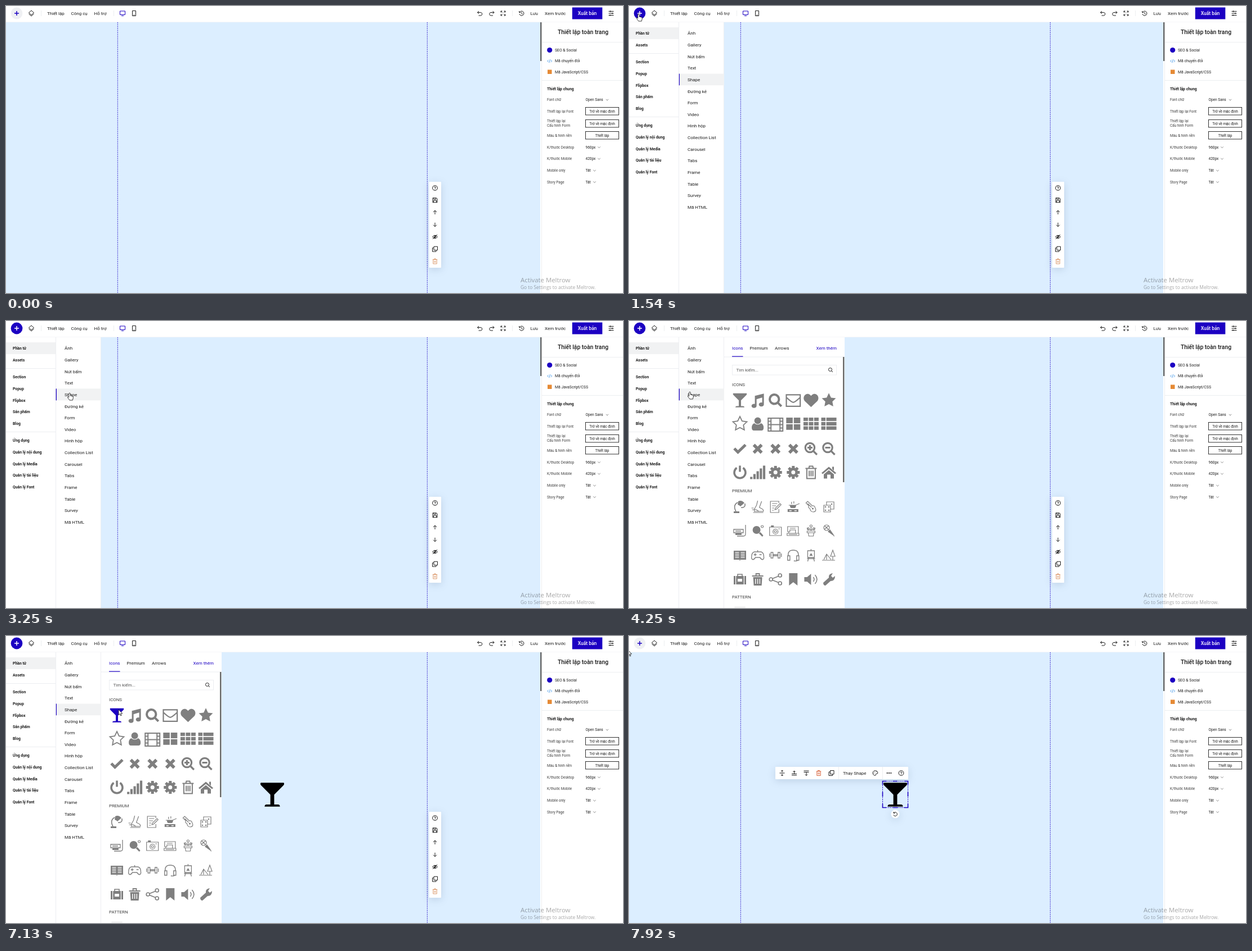
An HTML page for the animation above (8000 ms loop, 1096x511 px).

```html
<!DOCTYPE html>
<html lang="vi">
<head>
<meta charset="utf-8">
<title>Page builder</title>
<style>
html, body { margin: 0; width: 100%; height: 100%; overflow: hidden; background: #fff; }
svg { display: block; width: 100%; height: 100%; font-family: Roboto, sans-serif; }
text { white-space: pre; }
.float { filter: drop-shadow(0 3px 7px rgba(0, 20, 60, .13)); }
</style>
</head>
<body>
<svg id="stage" viewBox="0 0 1096 511"></svg>
<script>
const BLUE = '#1c00c2', INK = '#1c1c1c', GRAY = '#7f7f7f', ORANGE = '#d9905f';
const ROW = 20.65, LOOP = 8000;

// Drawing helpers; text is placed by the middle of its capitals.
const text = (x, y, s, size = 8, attrs = '') =>
  `<text x="${x}" y="${y + size * .36}" font-size="${size}" fill="${INK}" ${attrs}>${s}</text>`;
const rect = (x, y, w, h, fill, attrs = '') =>
  `<rect x="${x}" y="${y}" width="${w}" height="${h}" fill="${fill}" ${attrs}/>`;
const line = (x, y, d, color = INK, width = 1) =>
  `<path transform="translate(${x} ${y})" d="${d}" fill="none" stroke="${color}" stroke-width="${width}"/>`;
const group = (id, body, attrs = '') => `<g id="${id}" ${attrs}>${body}</g>`;
const ring = (r, x = 0, y = 0) => `M${x - r} ${y}a${r} ${r} 0 1 1 ${2 * r} 0a${r} ${r} 0 1 1 ${-2 * r} 0`;
const box = (x, y, w, h) => `M${x} ${y}h${w}v${h}h${-w}Z`;
const grid = (xs, ys, w, h) => ys.map(y => xs.map(x => box(x, y, w, h)).join('')).join('');

const ui = {
  layers: 'M0-5L4.5-1L0 3L-4.5-1ZM-4.5 1L0 5L4.5 1',
  monitor: 'M-4.5-4H4.5V2.5H-4.5ZM-2 4.5H2',
  phone: 'M-3-4.5H3V4.5H-3ZM-1 3H1',
  undo: 'M-2-4L-4.5-1.5L-2 1M-4.5-1.5H1.5A2.8 2.8 0 0 1 1.5 4H-2.5',
  redo: 'M2-4L4.5-1.5L2 1M4.5-1.5H-1.5A2.8 2.8 0 0 0-1.5 4H2.5',
  expand: 'M-4-1.5V-4H-1.5M1.5-4H4V-1.5M4 1.5V4H1.5M-1.5 4H-4V1.5M-4-4L-1.2-1.2M4-4L1.2-1.2M4 4L1.2 1.2M-4 4L-1.2 1.2',
  history: 'M-3.5-2A4 4 0 1 1-4 1M-4.3-4V-1.5H-1.8M0-2V.5L1.8 1.5',
  sliders: 'M-4.5-3.5H4.5M-4.5 0H4.5M-4.5 3.5H4.5M-1.5-4.7V-2.3M2-1.2V1.2M-2 2.3V4.7',
  help: ring(4.4) + 'M-1.4-1A1.4 1.4 0 1 1 0 .6V1.2M0 2V2.8',
  save: 'M-4-4H2.5L4-2.5V4H-4ZM-2-4V-1.5H1.5V-4M-2.5 4V.5H2.5V4',
  up: 'M0 3.5V-3.5M-3-.5L0-3.5L3-.5',
  down: 'M0-3.5V3.5M-3 .5L0 3.5L3 .5',
  hide: 'M-4.5 0Q0-5.5 4.5 0Q0 5.5-4.5 0Z' + ring(1.5) + 'M-4 4L4-4',
  copy: 'M-2-4.5H4.5V2H-2ZM-2-2H-4.5V4.5H2V2',
  trash: 'M-4.2-3H4.2M-1.5-3V-4.5H1.5V-3M-3.2-3V4.5H3.2V-3M-1-.8V2.5M1-.8V2.5',
  center: 'M-4.5 0H4.5M0-5V-1.5M0 1.5V5M-1.8-3.4L0-5L1.8-3.4M-1.8 3.4L0 5L1.8 3.4',
  toTop: 'M-4.5 1.5H4.5M-4.5 4H4.5M0 1.5V-4M-2-2L0-4L2-2',
  toBottom: 'M-4.5-4H4.5M-4.5-1.5H4.5M0-1.5V4.5M-2 2.5L0 4.5L2 2.5',
  palette: 'M0-4.4A4.4 4.4 0 1 0 0 4.4Q1.5 4 .8 2.6Q.6 1.2 2 1.3Q4.6 1.5 4.4-.5Q4-4.2 0-4.4M-2.4-.3V.6M-1-2.5V-1.6M1.6-2.5V-1.6',
  rotate: 'M-2.6-2A3.4 3.4 0 1 1-3.2 1.4M-3-4V-1.6H-.6'
};
const chevron = 'M-2.2-1L0 1.1L2.2-1';

const GLASS = 'M-12-12.5H12Q13-11 11.5-9.5L2 0V10.3H6Q8 10.5 8 12.5H-8Q-8 10.5-6 10.3H-2V0L-11.5-9.5Q-13-11-12-12.5Z';
const STAR = 'M0-13L3.9-4.9L12.5-3.7L6.3 2.2L7.8 10.8L0 6.7L-7.8 10.8L-6.3 2.2L-12.5-3.7L-3.9-4.9Z';
const LENS = ring(8.2, -2, -2) + 'M4 4L10.5 10.5';
const CROSS = 'M-7-7L7 7M7-7L-7 7';
const COG = ring(6) + 'M0-11.5V-8M0 8V11.5M-11.5 0H-8M8 0H11.5M-8-8L-5-5M8-8L5-5M-8 8L-5 5M8 8L5 5';
const BIN = 'M-10-7H10M-4-7L-3-11H3L4-7M-7.5-7V11H7.5V-7M-3.3-3V7M0-3V7M3.3-3V7';

// Library icons, six to a row: [filled path, stroked path, stroke width].
const icons = [
  [GLASS],
  ['M-5-8L11-12V7A4.5 3.6 0 1 1 8 4V-5L-2-2V9.5A4.5 3.6 0 1 1-5 6.5Z'],
  ['', LENS, 4],
  ['', 'M-12.3-10H12.3V10.5H-12.3ZM-12-5Q-3 3.5 0 3.5T12-5', 2.2],
  ['M0 12L-11.5 1C-16-6-10-12.5-5-11.5Q-2-11 0-8Q2-11 5-11.5C10-12.5 16-6 11.5 1Z'],
  [STAR],

  ['', STAR, 1.8],
  [ring(6, 0, -5.5) + 'M-6-1Q0 4 6-1Q11 1 10.5 8Q10 12 7 12H-7Q-10 12-10.5 8Q-11 1-6-1Z'],
  ['', box(-13, -10, 26, 23) + 'M-8-10V13M8-10V13M-8 1.5H8M-13-4.5H-8M-13 1.5H-8M-13 7.5H-8M8-4.5H13M8 1.5H13M8 7.5H13', 2],
  [grid([-12.5, 1], [-11, .7], 11.5, 10)],
  [grid([-13.5, -4, 5.5], [-11, -3.2, 4.6], 8, 6.1)],
  [grid([-13.5], [-11, -3.2, 4.6], 7.5, 6.1) + grid([-4.5], [-11, -3.2, 4.6], 18, 6.1)],

  ['', 'M-10-.5L-3.5 6L10-7', 5],
  ['', CROSS, 5.5], ['', CROSS, 5.5], ['', CROSS, 5.5],
  ['', LENS + 'M-6.5-2H2.5M-2-6.5V2.5', 3.2],
  ['', LENS + 'M-6.5-2H2.5', 3.2],

  ['', 'M-5.5-8A10 10 0 1 0 5.5-8M0-12V-1', 3.5],
  [[0, 1, 2, 3, 4].map(i => box(-13.5 + i * 5.7, 8 - i * 5, 4.2, 4 + i * 5)).join('')],
  ['', COG, 5], ['', COG, 5],
  ['', BIN, 2],
  ['M0-10L13 1L11 3L0-6L-11 3L-13 1ZM6-10H9V-3L6-6ZM0-4L9 3.5V11H3V4H-3V11H-9V3.5Z'],

  ['M-3-10Q3-13 8-7L1-1Q-1-3-4-4ZM-11 8H-1V11H-11Z', 'M-7 8Q-13-3-4-8M2 1Q7 2 9-2V-6', 1.6],
  ['', 'M0-11L-2-3L-6 4Q-1 5 2 8H10Q11 5 7 3L3 1L7-10M-11 2H-7M-10 5H-6M-8 10H10M-6 4V8H2', 1.2],
  ['', 'M6 4V10H-9V-10H6V-7M-6-6H3M-6-2H1M-6 2H-2M-6 6H-3M-1 5L0 2L8-6L10-4L2 4Z', 1.2],
  ['M-6-3H5Q5 2 2 2H-3Q-6 2-6-3ZM-10 4H9V9H-10Z' + grid([-7, 2], [6], 4, 1.4), 'M-8-3H4L11-6M-3-9V-5M1-10V-6', 1.2],
  [ring(1.6, 3, 3), 'M-9-7L-6-10L2-2Q6-3 7 1Q11 8 4 9Q-1 9-2 3Q-6 1-4-2ZM-6-6L1 1', 1.2],
  [ring(1.3, -6, 0) + ring(1.3, 0, 0) + ring(1.3, -6, 6) + ring(1.3, 0, 6) + ring(1.3, 5, -5), box(-9, -3, 12, 12) + 'M-4-3V-9H9V4H3', 1.2],

  ['M-8 5H3V8H-8Z', 'M-11-2H6V4H-11ZM-8 1H2M10-10V6Q10 10 6 10H-5', 1.3],
  [ring(7, -2, -1) + 'M2 5L5 3L10 9L8 11Z', ring(2, 8, -7), 1.2],
  ['M-8-9H-3V-6H-8Z', box(-10.5, -6, 21, 15) + ring(4.5, 0, 2) + ring(2, 0, 2) + 'M5-3H8', 1.2],
  ['', 'M-10-7H9V5H4V-1H-6V2H-10ZM-11 5H10V9H-11ZM-8 2V5M-6-4H4M-8 7H7', 1.2],
  ['', 'M-7 1H7V4H-7ZM-5 4L-4 10H4L5 4M0 1V-6M0-2Q-7-1-7-5M0-2Q7-1 7-5' + ring(2, 0, -8) + ring(1.8, -5, -3) + ring(1.8, 5, -3), 1.2],
  ['M-2 2L2-2L9 8L8 9Z', ring(5, -4, -5) + 'M-8-2L-1-8M-7-8L-1-2M8 9L10 10', 1.2],

  [box(-11, -8, 22, 16) + grid([-8.5, 1.5], [-5.5, -2.5, .5, 3.5], 7, 1.3), 'M0-8V10', 1],
  ['', 'M-6-6H6Q11-5 11 5Q9 11 4 4H-4Q-9 11-11 5Q-11-5-6-6ZM-7-1H-2M-4.5-3.5V1.5M3-1H7M0-6V-9', 1.4],
  ['', box(-8, -5, 3.5, 10) + box(4.5, -5, 3.5, 10) + 'M-10.5-3V3M10.5-3V3M-4.5-1H4.5M-4.5 1H4.5', 1.3],
  ['', box(-10, 1, 4, 8) + box(6, 1, 4, 8) + 'M-9 1Q-10-9 0-9T9 1M8 9Q6 11 1 10', 1.4],
  ['M-3 1L0-4L3 1Z', box(-6, -8, 12, 12) + 'M0-11V-8M-4 4L-6 11M4 4L6 11M-7 6H7', 1.3],
  ['', 'M-9 8L-4-2L4 8M-4-2L-4 8M-12 9H11M7 9V2M3 2L7-9L11 2Z', 1.2],

  [box(-11, -6, 22, 15) + box(-4, -1, 8, 5) + box(-8, -6, 1.2, 15) + box(6.8, -6, 1.2, 15), 'M-4-6V-9H4V-6', 1.6],
  ['M-8-4H8L7 11H-7Z' + grid([-4.5, -.7, 3.1], [-1], 1.4, 9), 'M-10-6H10M-3-7V-10H3V-7', 1.8],
  ['', ring(3, -8, 0) + ring(3, 8, -7) + ring(3, 8, 7) + 'M5-5.5L-5-1.5M-5 1.5L5 5.5', 1.7],
  ['M-7.5-11H7.5V11L0 5L-7.5 11Z'],
  ['M-12-4H-7L0-10V10L-7 4H-12Z', 'M4-4Q7 0 4 4M7-8Q14 0 7 8', 1.5],
  ['M-10 6L0-3Q-1-10 7-11L4-6L7-3L11-6Q11 3 3 3L-6 11Q-10 11-10 6Z']
];
const iconRows = [141.3, 183, 227.5, 269.5, 331, 373, 417, 460];
const iconMarkup = icons.map(([fill, stroke = '', width = 1], i) =>
  `<g class="icon" color="${GRAY}" transform="translate(${197 + i % 6 * 31.6} ${iconRows[i / 6 | 0]})">
   <path d="${fill}" fill="currentColor" fill-rule="evenodd"/>
   <path d="${stroke}" fill="none" stroke="currentColor" stroke-width="${width}"/></g>`).join('');

const faint = (x, y, w, h) => rect(x, y, w, h, '#eceef1');
const bold = 'font-weight="700"', medium = 'font-weight="500"', middle = 'text-anchor="middle"';

const canvasArea = rect(0, 29, 949, 482, '#dceeff') +
  [198.3, 748.3].map(x => `<path d="M${x} 29V511" stroke="${BLUE}" stroke-width=".85" stroke-dasharray="2 1.4"/>`).join('');

const header = rect(0, 0, 1096, 29, '#fff') +
  '<circle id="addDisc" cx="19" cy="13" r="10.4"/>' +
  '<path id="addSign" d="M15 13H23M19 9V17" stroke-width="1.5"/>' +
  line(45, 13, ui.layers) + [62, 191, 899].map(x => faint(x, 8, 1, 10)).join('') +
  text(73, 13, 'Thiết lập') + text(115.5, 13, 'Công cụ') + text(156.5, 13, 'Hỗ trợ') +
  line(207, 13, ui.monitor, BLUE) + line(227.5, 13, ui.phone) +
  line(842, 13, ui.undo) + line(862.5, 13, ui.redo) + line(883, 13, ui.expand) + line(916, 13, ui.history) +
  text(931.5, 13, 'Lưu') + text(957, 13, 'Xem trước') +
  rect(1005.8, 2.5, 53.5, 21, BLUE) + text(1032.5, 13, 'Xuất bản', 8.5, medium + ' ' + middle + ' style="fill:#fff"') +
  line(1075, 13, ui.sliders, INK, 1.2);

const settings = rect(949, 29, 147, 482, '#fff') + faint(951, 29, 1, 482) + rect(949, 29, 2.4, 69, '#666') +
  faint(952, 64, 144, 1) + faint(952, 132, 144, 1) +
  text(1025, 46, 'Thiết lập toàn trang', 10.35, medium + ' ' + middle) +
  `<circle cx="965.7" cy="78.5" r="4.6" fill="${BLUE}"/>` +
  line(965.7, 98, 'M-2-2L-4 0L-2 2M2-2L4 0L2 2M.8-3L-.8 3', '#4a9be8', .9) + rect(962, 113.5, 7.5, 7.5, '#e58a35') +
  text(975, 78.5, 'SEO &amp; Social', 6.85) + text(975, 98, 'Mã chuyển đổi', 6.85) + text(975, 117.5, 'Mã JavaScript/CSS', 6.85) +
  text(961, 147.5, 'Thiết lập chung', 6.85, bold) +
  [['Font chữ', 167], ['Thiết lập lại Font', 187.5], ['Thiết lập lại', 205], ['Cấu hình Form', 213], ['Màu &amp; hình nền', 231],
    ['K/thước Desktop', 251.5], ['K/thước Mobile', 272], ['Mobile only', 293], ['Story Page', 313.5]]
    .map(([s, y]) => text(961, y, s, 6.4, 'opacity=".85"')).join('') +
  [['Open Sans', 167, 1068], ['960px', 251.5, 1053.5], ['420px', 272, 1053.5], ['Tắt', 293, 1045.5], ['Tắt', 313.5, 1045.5]]
    .map(([s, y, x]) => text(1029.5, y, s, 6.5) + line(x, y, chevron, '#666', .8)).join('') +
  [['Trở về mặc định', 187.5], ['Trở về mặc định', 209.5], ['Thiết lập', 231]]
    .map(([s, y]) => rect(1029.5, Math.floor(y - 6.5) - .5, 59, 13.5, '#fff', `stroke="${INK}" stroke-width=".9"`) +
      text(1059, y, s, 6.4, middle)).join('');

const watermark = `<g opacity=".38" font-family="'Open Sans', sans-serif">` +
  text(914, 488, 'Activate Meltrow', 11.4) + text(914, 500.5, 'Go to Settings to activate Meltrow.', 8.4) + '</g>';

const tools = rect(751.5, 313, 21.5, 153, '#fff', 'rx="1"') +
  ['help', 'save', 'up', 'down', 'hide', 'copy'].map((name, i) => line(762, 324 + i * 21.75, ui[name])).join('') +
  line(762, 454.5, ui.trash, ORANGE, .9);

const categories = [['Phần tử', 'Assets'], ['Section', 'Popup', 'Flipbox', 'Sản phẩm', 'Blog'],
  ['Ứng dụng', 'Quản lý nội dung', 'Quản lý Media', 'Quản lý tài liệu', 'Quản lý Font']];
const categoryTop = [48.4, 99.8, 212.8];
const elements = ['Ảnh', 'Gallery', 'Nút bấm', 'Text', 'Shape', 'Đường kẻ', 'Form', 'Video', 'Hình hộp',
  'Collection List', 'Carousel', 'Tabs', 'Frame', 'Table', 'Survey', 'Mã HTML'];
const highlight = y => rect(89, y, 80, ROW, '#f1f2f3') + rect(88.8, y, 1.15, ROW, BLUE);

const menu = rect(0, 29, 169, 482, '#fff') + rect(0, 38, 89, 21, '#f1f2f3') +
  faint(0, 84, 89, 1) + faint(0, 197, 89, 1) + faint(88, 29, 1, 482) + faint(168, 29, 1, 482) +
  group('hoverRow', highlight(0)) + highlight(38 + 4 * ROW) +
  categories.map((list, g) => list.map((s, i) => text(12, categoryTop[g] + i * ROW, s, 6.85, bold)).join('')).join('') +
  elements.map((s, i) => text(104, 48.4 + i * ROW, s)).join('');

const library = rect(169, 29, 214, 482, '#fff') + faint(169, 63.5, 214, 1) + rect(183, 62.5, 19.5, 1.2, BLUE) +
  text(183, 48.4, 'Icons', 8, `style="fill:${BLUE}"`) + text(214.5, 48.4, 'Premium') + text(259, 48.4, 'Arrows') +
  text(369, 48.4, 'Xem thêm', 8, `text-anchor="end" style="fill:${BLUE}"`) +
  rect(183.5, 78.5, 185, 17.5, '#fff', 'stroke="#eceef1"') +
  text(190.5, 87, 'Tìm kiếm...', 8, 'opacity=".75"') + line(358, 87, ring(3, -.5, -.5) + 'M1.7 1.7L4 4') +
  [['ICONS', 113], ['PREMIUM', 302], ['PATTERN', 491.5]].map(([s, y]) => text(183, y, s, 7.9, 'opacity=".85"')).join('') +
  iconMarkup + rect(187, 508, 20, 3, '#f3f3f3', 'rx="1.5"') + rect(380, 64, 2.4, 223, '#666');

const selection = rect(450.5, 258.5, 45, 47, 'none', `stroke="${BLUE}" stroke-dasharray="2 1.5"`) +
  line(473, 282, 'M-22.5-17V-23.5H-16M16-23.5H22.5V-17M22.5 17V23.5H16M-16 23.5H-22.5V17M-4-23.5H4M-4 23.5H4M-22.5-4V4M22.5-4V4', BLUE, 1.6) +
  '<circle class="float" cx="473" cy="317" r="7.5" fill="#fff"/>' + line(473, 317, ui.rotate);

const actions = rect(260, 233, 236, 22, '#fff', 'rx="1"') +
  line(272, 244, ui.center) + line(293.5, 244, ui.toTop) + line(315, 244, ui.toBottom) +
  line(337, 244, ui.trash, '#d8633a') + line(359.5, 244, ui.copy) + faint(372, 233, 1, 22) + text(380, 244, 'Thay Shape') +
  line(437.5, 244, ui.palette) + faint(450, 233, 1, 22) + line(462, 244, 'M-4.2 0h1.8M-.9 0H.9M2.4 0h1.8', INK, 1.8) +
  line(483.5, 244, ui.help);

const tooltip = rect(9, 27, 42, 18, '#5f6468', 'rx="1"') + text(30, 36, 'Thêm mới', 6.85, middle + ' style="fill:#fff"');

const $ = id => document.getElementById(id);
$('stage').innerHTML = canvasArea +
  `<path id="glass" d="${GLASS}" transform="translate(473 282.5) scale(1.7)"/>` +
  group('tools', tools, 'class="float"') + group('selection', selection) + group('actions', actions, 'class="float"') +
  header + faint(0, 28.5, 1096, .5) + settings + watermark + group('menu', menu) + group('library', library) +
  group('tooltip', tooltip) +
  group('cursor', `<path id="arrow" d="M0 0V9.5L2.2 7.5L3.8 11L5.2 10.4L3.7 7H6.8Z"/>
    <path id="hand" d="M-1.3 1Q0-1 1.3 1V5L5 5.8Q6.8 6.5 6.3 9L5.3 13H0L-3.4 8.5Q-4 6.5-2.5 7L-1.3 8Z"/>`,
    'fill="#fff" stroke="#111" stroke-width=".8"');
const iconNodes = document.querySelectorAll('.icon');

// Pointer stops: time, x, y.
const path = [
  [70, 1058, 502], [400, 53, 0], [730, 38, 8], [1150, 17, 14], [1700, 17, 14], [2200, 124, 100], [2510, 111, 119],
  [2580, 111, 120], [2850, 113, 128], [3400, 113, 128], [3750, 152, 132], [4050, 108, 126], [4520, 108, 126],
  [4720, 184, 128], [5000, 184, 128], [5400, 249, 138], [5800, 193, 126], [6730, 193, 126], [6920, 200, 131],
  [7340, 200, 131], [7920, -2, 25]
];
const ramp = (t, from, to) => Math.min(1, Math.max(0, (t - from) / (to - from)));
const pointerAt = t => {
  const i = Math.max(1, path.findIndex(stop => stop[0] > t));
  const [a, b] = t >= 7920 ? path.slice(-2) : [path[i - 1], path[i]];
  const k = ramp(t, a[0], b[0]), e = k * k * (3 - 2 * k);
  return [a[1] + (b[1] - a[1]) * e, a[2] + (b[2] - a[2]) * e];
};
const show = (id, on) => $(id).style.display = on ? '' : 'none';

function render(t) {
  const within = (from, to) => t >= from && t < to;
  const [x, y] = pointerAt(t);
  const open = within(1540, 7190), libraryOpen = within(1600, 3120) || within(4250, 7190);

  show('menu', open);
  show('library', libraryOpen);
  show('tools', t < 7190);
  show('glass', t >= 7060);
  show('selection', t >= 7190);
  $('actions').style.opacity = ramp(t, 7380, 7560);
  $('tooltip').style.opacity = t < 1540 ? ramp(t, 1130, 1400) : 0;
  $('addDisc').setAttribute('fill', open ? BLUE : '#eff0f3');
  $('addSign').setAttribute('stroke', open ? '#fff' : BLUE);

  show('hoverRow', x > 89 && x < 169);
  $('hoverRow').setAttribute('transform', `translate(0 ${38 + Math.floor((y - 38) / ROW) * ROW})`);
  for (let i = 0; i < 2; i++) {
    const hovered = libraryOpen && Math.abs(x - 197 - i * 31.6) < 12;
    iconNodes[i].setAttribute('color', hovered ? BLUE : GRAY);
  }

  const hand = within(900, 4600);
  show('hand', hand);
  show('arrow', !hand);
  show('cursor', within(70, 400) || t >= 730);
  $('cursor').setAttribute('transform', `translate(${x} ${y})`);
}

function tick() {
  render(performance.now() % LOOP);
  requestAnimationFrame(tick);
}
tick();
</script>
</body>
</html>
```
